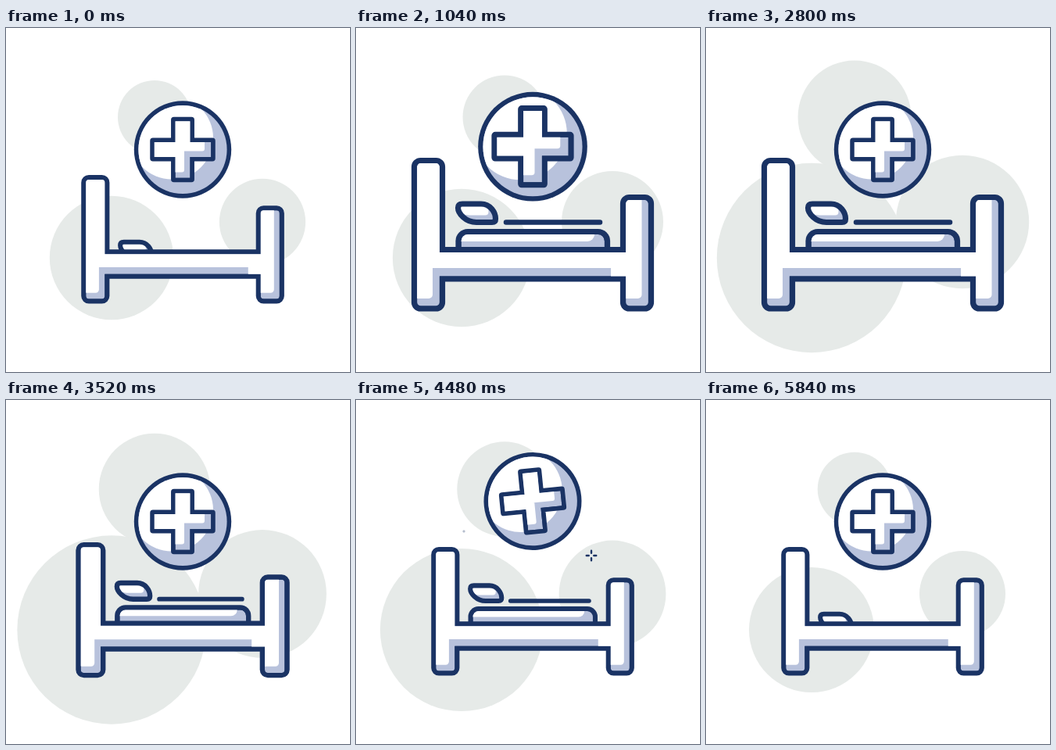
These frames come from a looping animation (440x440 px, 6000 ms). An HTML page with a canvas:

```html
<!DOCTYPE html>
<html lang="en">
<head>
<meta charset="utf-8">
<title>Hospital bed</title>
<style>
  html, body { margin: 0; width: 100%; height: 100%; overflow: hidden; background: #fff; }
  canvas { display: block; width: 440px; height: 440px; }
</style>
</head>
<body>
<canvas id="stage" width="440" height="440"></canvas>
<script>
const ctx = document.getElementById('stage').getContext('2d');
const LOOP = 6000, HALF = LOOP / 2, STEP = 80, TAU = Math.PI * 2;
const NAVY = '#1a3364', SHADE = '#b8c2dc', GREY = '#e6eae8', WHITE = '#fff';

const clamp = u => Math.min(1, Math.max(0, u));
const span = (t, from, length) => clamp((t - from) / length);
const ease = (t, from, length) => (1 - Math.cos(Math.PI * span(t, from, length))) / 2;

function disc(x, y, r, color) {
  ctx.fillStyle = color;
  ctx.beginPath();
  ctx.arc(x, y, r, 0, TAU);
  ctx.fill();
}

// Rounded boxes given by their edges, all widened by d
function boxes(list, d = 0) {
  const path = new Path2D();
  for (const { left, top, right, bottom, r = 0 } of list) {
    path.roundRect(left - d, top - d, right - left + 2 * d, bottom - top + 2 * d, Math.max(0, r + d));
  }
  return path;
}

const box = (left, top, right, bottom, r) => ({ left, top, right, bottom, r });

function fill(path, color) {
  ctx.fillStyle = color;
  ctx.fill(path);
}

// Outline around the union of some boxes, shaded inside except for the lit ones
function block(list, width, lit) {
  const inner = boxes(list, -width / 2);
  fill(boxes(list, width / 2), NAVY);
  ctx.save();
  ctx.clip(inner);
  fill(inner, SHADE);
  fill(boxes(lit), WHITE);
  ctx.restore();
}

// Bed edges
const LEFT = 74.5, RIGHT = 377.5, HEAD = 169.5, FOOT = 216.5, FLOOR = 359;
const POST = 36, RAIL = 283.5, UNDER = 321, LINE = 7.2;

const frame = [
  box(LEFT, HEAD, LEFT + POST, FLOOR, 8),
  box(RIGHT - POST, FOOT, RIGHT, FLOOR, 8),
  box(LEFT + POST / 2, RAIL, RIGHT - POST / 2, UNDER)
];
const frameLit = [
  box(LEFT, HEAD, LEFT + POST, 307),
  box(LEFT, RAIL, RIGHT - 12, 307),
  box(LEFT, HEAD, 98, FLOOR - 13, 5),
  box(326, FOOT - 20, RIGHT - 12, FLOOR - 13, 5)
];
const pillow = new Path2D(
  'M136 225H160C172 225 178.5 236 178.5 244Q178.5 248.5 174 248.5' +
  'H154C140 248.5 130.5 237 130.5 230Q130.5 225 136 225Z');

function drawPillow() {
  ctx.save();
  ctx.clip(pillow);
  fill(pillow, SHADE);
  ctx.translate(-9, -9);
  fill(pillow, WHITE);
  ctx.restore();
  ctx.lineWidth = LINE;
  ctx.stroke(pillow);
}

function drawBed(t) {
  const size = 0.837 + 0.163 * (ease(t, 0, 800) - ease(t, HALF, 800));
  const sink = 43.5 * (1 - ease(t, 100, 800) + ease(t, 4800, 800));
  ctx.save();
  ctx.translate(226.3, 301);
  ctx.scale(size, size);
  ctx.translate(-226.3, -301);

  // Bedding slides up from behind the rail
  ctx.save();
  ctx.clip(boxes([box(0, 0, 440, (RAIL + UNDER) / 2)]));
  ctx.translate(0, sink);
  block([box(131, 260.5, 321.5, 320, 12)], LINE, [box(100, 240, 305, 273, 9)]);
  drawPillow();
  ctx.lineWidth = 6.5;
  ctx.beginPath();
  ctx.moveTo(192, 248.5);
  ctx.lineTo(312, 248.5);
  ctx.stroke();
  ctx.restore();

  block(frame, LINE, frameLit);
  ctx.restore();
}

const ARM = 39, WIDE = 12.2;
const cross = [box(-WIDE, -ARM, WIDE, ARM, 1), box(-ARM, -WIDE, ARM, WIDE, 1)];
const crossLit = [
  box(-ARM, -ARM, 2, ARM - 10, 3),
  box(-ARM, -ARM, ARM - 11, 2, 3)
];

// Swells, hops with a tilt while shrinking, then settles
function drawBadge(t) {
  const grow = ease(t, 600, 520), drop = ease(t, 1120, 720), rest = ease(t, 1840, 410);
  const size = 1 + 0.13 * grow - 0.25 * drop + 0.12 * rest;
  const hop = span(t, 1010, 810);
  ctx.save();
  ctx.translate(226, 155.5 - 107 * hop * (1 - hop));
  ctx.rotate(-0.2 * (drop - rest));
  ctx.scale(size, size);
  disc(0, 0, 62.2, NAVY);
  disc(0, 0, 56.6, SHADE);
  ctx.save();
  ctx.beginPath();
  ctx.arc(0, 0, 56.6, 0, TAU);
  ctx.clip();
  disc(-14, -15, 53, WHITE);
  ctx.restore();
  ctx.scale(size, size);
  block(cross, 5.5, crossLit);
  ctx.restore();
}

function drawBlob(t, x, y, r, lag) {
  const wave = (1 - Math.cos((t - lag) / LOOP * TAU)) / 2;
  disc(x, y, r * (1 + 0.55 * wave), GREY);
}

function drawSparkle(t, x, y, full, start) {
  const r = full / 2 * (ease(t, start, 250) - ease(t, start + 500, 300));
  if (r < 0.2) return;
  ctx.save();
  ctx.translate(x, y);
  ctx.lineWidth = r * 0.32;
  ctx.beginPath();
  for (let i = 0; i < 4; i++) {
    ctx.moveTo(r * 0.44, 0);
    ctx.lineTo(r * 0.84, 0);
    ctx.rotate(TAU / 4);
  }
  ctx.stroke();
  ctx.restore();
}

// In order of appearance
const sparkles = [[301, 199, 28], [138, 168, 22], [340, 159.5, 28], [313, 108, 25], [110.5, 124, 22]];

function draw(t) {
  ctx.fillStyle = WHITE;
  ctx.fillRect(0, 0, 440, 440);
  ctx.strokeStyle = NAVY;
  ctx.lineCap = ctx.lineJoin = 'round';
  drawBlob(t, 190, 114, 47, 40);
  drawBlob(t, 328, 248, 55, -130);
  drawBlob(t, 135, 294, 79, 130);
  drawBed(t);
  drawBadge(t % HALF);
  sparkles.forEach(([x, y, full], i) => drawSparkle(t % HALF, x, y, full, 1350 + 70 * i));
}

const begin = performance.now();
function tick() {
  const t = (performance.now() - begin) % LOOP;
  draw(Math.min(LOOP - 2 * STEP, Math.floor(t / STEP) * STEP));
  requestAnimationFrame(tick);
}
tick();
</script>
</body>
</html>
```
